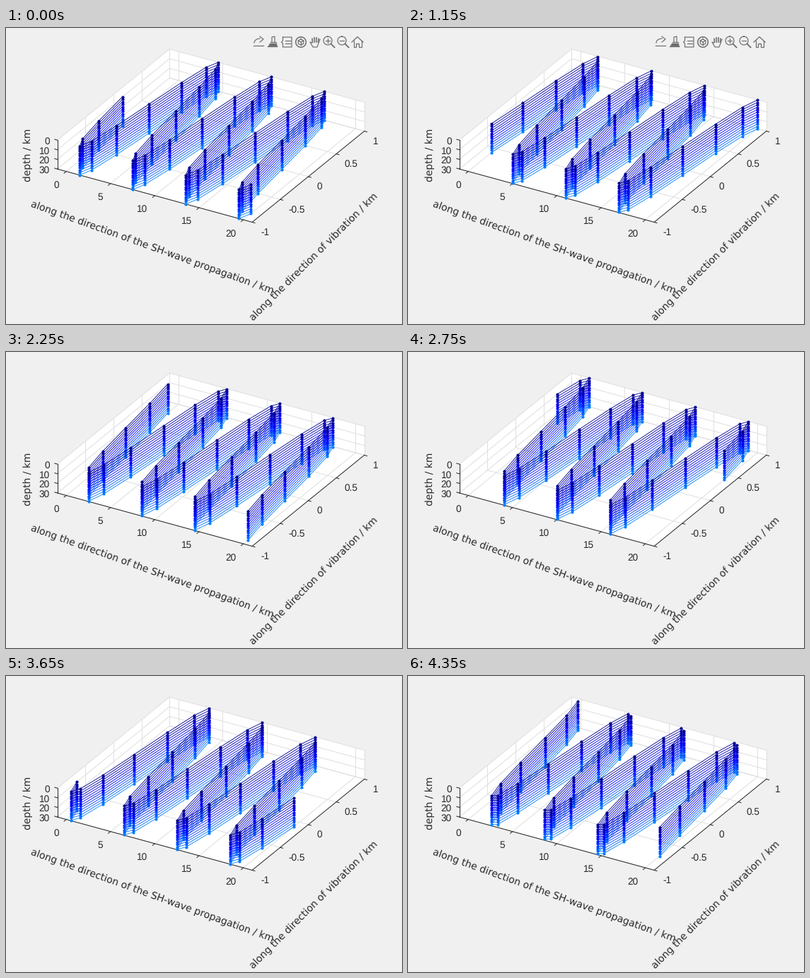
Animation, 560 px wide and 420 px high, one loop 4.45 s. Source, as a matplotlib script:

```python
import numpy as np
import matplotlib.pyplot as plt
from matplotlib.animation import FuncAnimation

W, H, DPI = 560, 420, 100
PT = 72 / DPI                      # points per pixel
INK, GRID, ICON = "#262626", "#dfdfdf", "#6e6e6e"
plt.rcParams["text.hinting"] = "none"

# Orthographic view: screen vectors of the three data axes
ORIGIN = np.array([164.5, 97.9])
EX = np.array([12.52, 3.43])
EY = np.array([79.3, -64.6])
EZ = np.array([0, 41 / 30])
X0, X1, Y0, Y1, Z0, Z1 = -1, 21, -1, 1, 0, 30

# Wave length in km, period in steps, and the step that hides the toolbar
LENGTH, PERIOD, TOOLBAR_END = 6, 20, 15
xs = np.arange(0, 20.25, 0.5)
depths = np.linspace(Z0, Z1, 13)

fig = plt.figure(figsize=(W / DPI, H / DPI), dpi=DPI, facecolor="#f0f0f0")
ax = fig.add_axes([0, 0, 1, 1])
ax.set_xlim(0, W)
ax.set_ylim(H, 0)
ax.axis("off")


def project(x, y, z):
    x, y, z = np.broadcast_arrays(x, y, z)
    return ORIGIN + x[..., None] * EX + y[..., None] * EY + z[..., None] * EZ


def path(points, color=GRID, width=1.0, z=1, **kw):
    x, y = np.asarray(points, float).T
    return ax.plot(x, y, color=color, lw=width * PT, zorder=z, **kw)[0]


def edge(a, b, color=GRID, z=1):
    path([project(*a), project(*b)], color, z=z)


def title(x, y, text, angle):
    ax.text(x, y, text, size=13.9 * PT, color=INK, rotation=angle, family="DejaVu Sans",
            rotation_mode="anchor", ha="center", va="center")


def tick(p, direction, value, offset, ha):
    path([p, p + 4 * direction / np.hypot(*direction)], INK, z=2)
    ax.text(*(p + offset), f"{value:g}", size=13.6 * PT, color=INK,
            family="Liberation Sans", ha=ha, va="center_baseline")


def draw_box():
    floor = [(X0, Y0, Z1), (X1, Y0, Z1), (X1, Y1, Z1), (X0, Y1, Z1)]
    left = [(X0, Y0, Z0), (X0, Y1, Z0), (X0, Y1, Z1), (X0, Y0, Z1)]
    back = [(X0, Y1, Z0), (X1, Y1, Z0), (X1, Y1, Z1), (X0, Y1, Z1)]
    for face in (floor, left, back):
        ax.fill(*project(*np.transpose(face)).T, color="white", lw=0, zorder=0)

    for x in range(0, 21, 5):
        edge((x, Y0, Z1), (x, Y1, Z1))
        edge((x, Y1, Z0), (x, Y1, Z1))
        tick(project(x, Y0, Z1), -EY, x, (-10.3, 18.3), "right")
    for y in np.arange(Y0, Y1 + 0.1, 0.5):
        edge((X0, y, Z1), (X1, y, Z1))
        edge((X0, y, Z0), (X0, y, Z1))
        tick(project(X1, y, Z1), EX, y, (11.8, 13.3), "left")
    for z in range(Z0, Z1 + 1, 10):
        edge((X0, Y0, z), (X0, Y1, z))
        edge((X0, Y1, z), (X1, Y1, z))
        tick(project(X0, Y0, z), -EX, z, (-11, 0.6), "right")
    edge((X1, Y1, Z0), (X1, Y1, Z1))

    corner = (X1, Y0, Z1)
    edge((X0, Y0, Z1), corner, INK, 2)
    edge(corner, (X1, Y1, Z1), INK, 2)
    edge((X0, Y0, Z0), (X0, Y0, Z1), INK, 2)

    title(206.5, 312, "along the direction of the SH-wave propagation / km", -19.9)
    title(436, 325, "along the direction of vibration / km", 45)
    title(31.5, 180.5, "depth / km", 90)


def draw_toolbar():
    parts = []

    def stroke(cx, points, width=1.2):
        parts.append(path(np.add(points, (cx, 20)), ICON, width))

    def ngon(cx, r, n, y=0, width=1.2):
        a = np.linspace(0, 2 * np.pi, n + 1) + np.pi / 2
        stroke(cx, np.c_[r * np.cos(a), y - r * np.sin(a)], width)

    def bar(cx, x, y, half=3):
        stroke(cx, [(x - half, y), (x + half, y)])

    export, brush, tip, rotate, hand, zoom_in, zoom_out, home = 357 + 20 * np.arange(8)

    t = np.linspace(0, np.pi / 2, 12)
    stroke(export, np.c_[2 - 8 * np.cos(t), 1 - 6 * np.sin(t)])
    stroke(export, [(2, -8), (7, -4), (2, 0)])
    bar(export, 0, 5, 7)

    stroke(brush, [(-1, 0), (-1, -7), (3, -8), (3, 0)])
    bar(brush, 1, 0, 4)
    for y in np.arange(1.5, 7, 0.8):
        bar(brush, 1 - y / 4, y, 3.5 + y / 2)

    stroke(tip, [(-5.5, -7), (7, -7), (7, 7), (-5.5, 7), (-5.5, 2), (-7.5, 0), (-5.5, -2),
                 (-5.5, -7)])
    for y in (-2.5, 2):
        bar(tip, 1, y, 3.5)

    ngon(rotate, 7.3, 40, width=1.5)
    ngon(rotate, 4.3, 6)
    for a in np.pi * (np.arange(3) * 2 / 3 + 0.5):
        stroke(rotate, [(0, 0), (4.3 * np.cos(a), 4.3 * np.sin(a))])

    stroke(hand, [(-4, 1), (-7, 0), (-3, 7), (3, 7), (7, -4)])
    for x in (-4, -1, 2, 5):
        stroke(hand, [(x, -7 + abs(x - 0.5) / 2), (x * 0.9, 0)], 1.6)

    for cx in (zoom_in, zoom_out):
        ngon(cx - 2, 6, 32, -2)
        stroke(cx, [(2.5, 2.5), (7.5, 7.5)], 1.8)
        bar(cx, -2, -2)
    stroke(zoom_in, [(-2, -5), (-2, 1)])

    stroke(home, [(-8, 0), (0, -7.5), (8, 0)], 1.3)
    for s in (-1, 1):
        stroke(home, [(5.5 * s, -2), (5.5 * s, 7), (1.8 * s, 7), (1.8 * s, 2), (0, 2)])
    return parts


def layer(depth):
    v = 0.5625 + 0.9375 * depth / Z1
    color = (0, max(v - 1, 0), min(v, 1))
    return path([(0, 0)], color, 0.85, 10 - depth / Z1, marker="o", ms=4.2 * PT, mew=0)


draw_box()
toolbar = draw_toolbar()
layers = [layer(d) for d in depths]


def update(i):
    step = (i + 1) // 2            # the first pose is held for half as long
    y = np.sin(2 * np.pi * (step / PERIOD - xs / LENGTH))
    for line, depth in zip(layers, depths):
        line.set_data(*project(xs, y, depth).T)
    for part in toolbar:
        part.set_visible(step < TOOLBAR_END)
    return layers + toolbar


anim = FuncAnimation(fig, update, frames=89, interval=50, repeat=True, repeat_delay=0)
plt.show()
```
